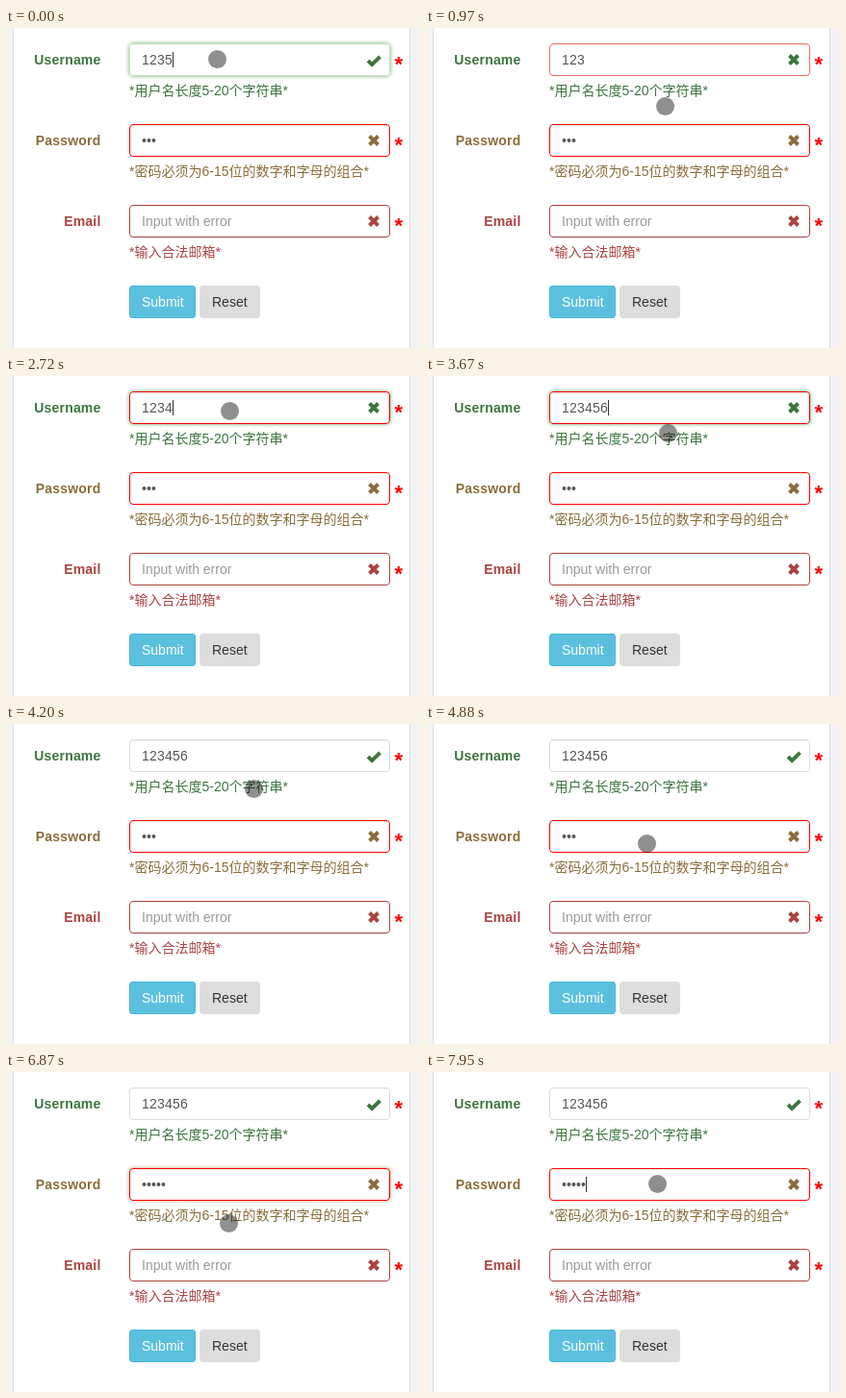
Write an HTML page with a canvas that moves like this. It is 430 px wide and 333 px high and loops after 8000 ms.

```html
<!DOCTYPE html>
<html lang="en">
<head>
<meta charset="utf-8">
<title>Form validation</title>
<style>
  html, body { margin: 0; width: 100%; height: 100%; overflow: hidden; background: #fff; }
  canvas { display: block; }
</style>
</head>
<body>
<canvas id="stage" width="430" height="333"></canvas>
<script>
const ctx = document.getElementById('stage').getContext('2d');
const LOOP = 8000;
const STEP = 134.8;       // screen refresh interval, ms
const BLINK = 4;          // caret half period, in steps
const MIN_LENGTH = 5;
const FAMILY = '"Liberation Sans", "Noto Sans CJK SC", "Noto Sans CJK", sans-serif';
const GREEN = '#3c763d', BROWN = '#8a6d3b', MAROON = '#a94442';
const FIELD = { x: 128, w: 271, h: 34, textX: 141 };

// Times below count steps.
const username = {
  y: 16, label: 'Username', help: '*用户名长度5-20个字符串*', color: GREEN,
  glowColor: '#67b168', charWidth: 8, spacing: .2,
  sessions: [{ from: -2, to: 7 }, { from: 13, to: 30 }],
  edits: [{ at: -2, text: '1235' }, { at: 2, text: '123' }, { at: 20, text: '1234' },
          { at: 22, text: '12345' }, { at: 24, text: '123456' }]
};
const password = {
  y: 100, label: 'Password', help: '*密码必须为6-15位的数字和字母的组合*', color: BROWN,
  border: '#f00', glowColor: '#c0a16b', charWidth: 5, spacing: .1,
  sessions: [{ from: 38, to: 52 }, { from: 59, to: 70 }],
  edits: [{ at: -2, text: '•••' }, { at: 45, text: '•••••' }]
};
const email = {
  y: 184, label: 'Email', help: '*输入合法邮箱*', color: MAROON, border: MAROON,
  placeholder: 'Input with error', sessions: [], edits: []
};

const pointerStart = { x: 219, y: 32 };
const glides = [
  { from: 2, to: 6, x: 248, y: 81 },
  { from: 8, to: 11, x: 232, y: 36 },
  { from: 25, to: 28, x: 257, y: 67 },
  { from: 32, to: 35, x: 229, y: 133 },
  { from: 35, to: 37, x: 228, y: 114 },
  { from: 47, to: 51, x: 231, y: 157 },
  { from: 53, to: 58, x: 240, y: 116 }
];

const lerp = (a, b, k) => a + (b - a) * k;
const clamp = v => Math.min(1, Math.max(0, v));
const ease = k => k * k * (3 - 2 * k);
const lastEdit = (field, n) => field.edits.findLast(edit => edit.at <= n);

function pointerAt(n) {
  return glides.reduce((p, g) => {
    const k = ease(clamp((n - g.from) / (g.to - g.from)));
    return { x: lerp(p.x, g.x, k), y: lerp(p.y, g.y, k) };
  }, pointerStart);
}

// The name is checked each time its field loses focus.
function isNameValid(n) {
  const blurred = username.sessions.findLast(s => s.to <= n);
  return !blurred || lastEdit(username, blurred.to).text.length >= MIN_LENGTH;
}

function nameBorder(n, glowing) {
  const red = (!isNameValid(n) + !isNameValid(n - 1)) / 2;
  const calm = glowing ? [200, 224, 200] : [221, 221, 221];
  return `rgb(${calm.map((c, i) => Math.round(lerp(c, i ? 0 : 255, red)))})`;
}

function text(str, x, y, color, { size = 14, weight = 400, align = 'left', spacing = 0 } = {}) {
  ctx.font = `${weight} ${size}px ${FAMILY}`;
  ctx.letterSpacing = spacing + 'px';
  ctx.textAlign = align;
  ctx.fillStyle = color;
  ctx.fillText(str, x, y);
}

function box(x, y, w, h, fill, border) {
  ctx.beginPath();
  ctx.roundRect(x, y, w, h, 4);
  ctx.fillStyle = fill;
  ctx.fill();
  if (!border) return;
  ctx.beginPath();
  ctx.roundRect(x + .5, y + .5, w - 1, h - 1, 3.5);
  ctx.lineWidth = 1;
  ctx.strokeStyle = border;
  ctx.stroke();
}

function icon(valid, y, color) {
  ctx.beginPath();
  if (valid) {
    ctx.moveTo(376, y + 18);
    ctx.lineTo(380.1, y + 22);
    ctx.lineTo(388.5, y + 13.9);
  } else {
    ctx.moveTo(377.5, y + 12.5);
    ctx.lineTo(386.5, y + 21.5);
    ctx.moveTo(386.5, y + 12.5);
    ctx.lineTo(377.5, y + 21.5);
  }
  ctx.lineWidth = 3.9;
  ctx.strokeStyle = color;
  ctx.stroke();
}

function drawField(field, n) {
  const { x, w, h, textX } = FIELD;
  const { y, color } = field;
  const session = field.sessions.find(s => s.from <= n && n < s.to);
  const glowing = session && n > session.from;
  const isName = field === username;

  ctx.save();
  if (glowing) {
    ctx.shadowBlur = 4;
    ctx.shadowColor = field.glowColor;
  }
  box(x, y, w, h, '#fff');
  ctx.restore();
  box(x, y, w, h, '#fff', isName ? nameBorder(n, glowing) : field.border);
  ctx.fillStyle = 'rgba(0,0,0,.05)';
  ctx.fillRect(x + 3, y + 1, w - 6, 1);

  text(field.label, 98.5, y + 22, color, { weight: 700, align: 'right', spacing: .2 });
  text(field.help, x, y + 54, color);
  text('*', 403.4, y + 29, '#f00', { size: 22, weight: 700 });
  icon(isName && isNameValid(n), y, color);

  const edit = lastEdit(field, n);
  if (!edit) return text(field.placeholder, textX, y + 22, '#999');
  text(edit.text, textX, y + 22, '#555', { spacing: field.spacing });
  if (!session) return;
  const idle = n - Math.max(session.from, edit.at);
  if (idle % (2 * BLINK) < BLINK) {
    ctx.fillStyle = '#333';
    ctx.fillRect(textX + field.charWidth * edit.text.length, y + 9, 1, 16);
  }
}

function draw(t) {
  const n = Math.floor((t + 10) / STEP);
  ctx.fillStyle = '#f3f3f3';
  ctx.fillRect(0, 0, 430, 333);
  ctx.fillStyle = '#ddd';
  ctx.fillRect(7, 0, 413, 333);
  ctx.fillStyle = '#fff';
  ctx.fillRect(8, 0, 411, 333);

  for (const field of [username, password, email]) drawField(field, n);

  box(128, 268, 69, 34, '#5bc0de', '#46b8da');
  text('Submit', 141, 290, '#fff');
  box(201, 268, 63, 34, '#ddd');
  text('Reset', 214, 290, '#333');

  const pointer = pointerAt(n);
  ctx.beginPath();
  ctx.arc(Math.round(pointer.x) + .5, Math.round(pointer.y) + .5, 9.5, 0, Math.PI * 2);
  ctx.fillStyle = 'rgba(0,0,0,.44)';
  ctx.fill();
}

const start = performance.now();
function tick() {
  draw((performance.now() - start) % LOOP);
  requestAnimationFrame(tick);
}
tick();
</script>
</body>
</html>
```
